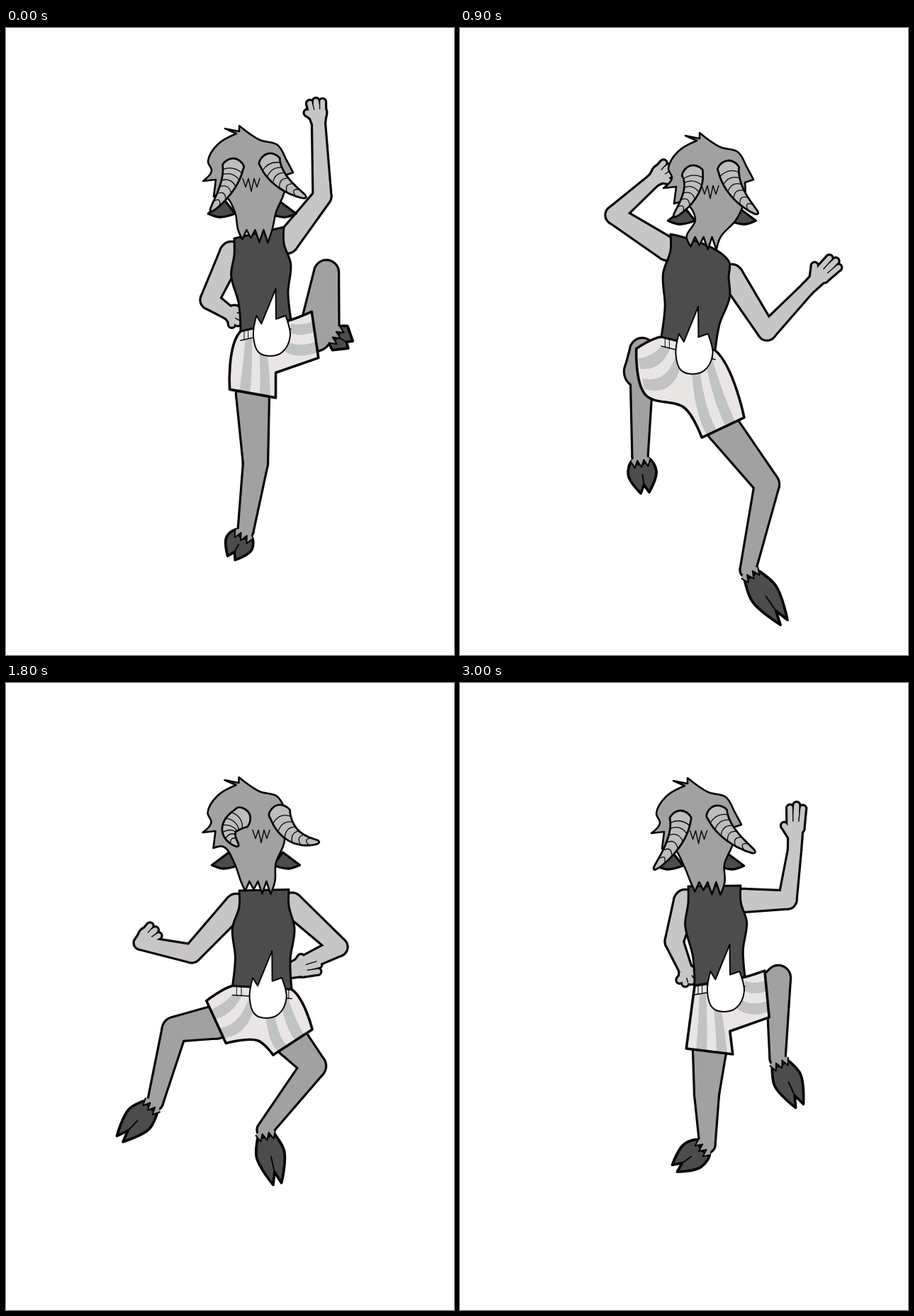
An HTML page with a canvas that plays this animation: 632 by 885 pixels, repeating every 3.1 s.

```html
<!DOCTYPE html>
<html lang="en">
<head>
<meta charset="utf-8">
<title>Dancing faun</title>
<style>
html, body { margin: 0; width: 100%; height: 100%; overflow: hidden; background: #fff; }
canvas { display: block; }
</style>
</head>
<body>
<canvas id="stage" width="632" height="885"></canvas>
<script>
const ctx = document.getElementById('stage').getContext('2d');
const LOOP = 3100, STEP = 100;
const FUR = '#a1a1a1', SKIN = '#c8c5c7', DARK = '#4c4c4c', CLOTH = '#e9e5e5', STRIPE = '#c1c3c2', HORN = '#bdbdbd';

// Arms: shoulder, elbow, wrist, fingertip. Legs: hem, knee, ankle, toe. Horns: tips only.
const poses = [
  { time: 0, head: [343, 212], horns: [[289, 258], [423, 239]], waist: [[331, 428], [402, 412]],
    armL: [[318, 318], [287, 384], [314, 402], [332, 408]], armR: [[396, 302], [446, 238], [441, 135], [437, 101]],
    legL: [[348, 516], [352, 614], [338, 710], [318, 748]], legR: [[436, 433], [452, 345], [459, 430], [486, 447]] },
  { time: 300, head: [347, 210], horns: [[290, 261], [432, 230]], waist: [[334, 437], [403, 410]],
    armL: [[322, 318], [261, 371], [290, 305], [318, 284]], armR: [[395, 302], [463, 364], [463, 282], [424, 268]],
    legL: [[340, 525], [316, 590], [304, 690], [293, 767]], legR: [[435, 456], [467, 460], [449, 525], [507, 550]] },
  { time: 900, head: [352, 222], horns: [[302, 266], [420, 262]], waist: [[284, 436], [360, 455]],
    armL: [[293, 312], [218, 264], [273, 215], [296, 195]], armR: [[383, 350], [433, 428], [490, 368], [533, 326]],
    legL: [[255, 485], [257, 455], [254, 605], [261, 656]], legR: [[371, 564], [433, 644], [406, 765], [457, 839]] },
  { time: 1400, head: [350, 212], horns: [[293, 253], [430, 243]], waist: [[301, 435], [391, 437]],
    armL: [[320, 318], [272, 404], [276, 345], [268, 328]], armR: [[398, 325], [484, 340], [436, 272], [425, 200]],
    legL: [[293, 527], [282, 566], [301, 668], [262, 731]], legR: [[415, 472], [458, 471], [380, 545], [445, 572]] },
  { time: 2200, head: [335, 202], horns: [[362, 207], [453, 206]], waist: [[338, 420], [415, 428]],
    armL: [[330, 310], [258, 358], [228, 442], [262, 464]], armR: [[408, 300], [432, 388], [454, 466], [462, 493]],
    legL: [[300, 430], [254, 366], [183, 450], [126, 488]], legR: [[394, 542], [387, 588], [330, 693], [273, 758]] },
  { time: 2600, head: [337, 210], horns: [[284, 265], [414, 235]], waist: [[338, 427], [410, 427]],
    armL: [[326, 312], [280, 370], [303, 485], [325, 550]], armR: [[405, 312], [446, 345], [455, 445], [472, 482]],
    legL: [[300, 475], [260, 468], [278, 568], [233, 601]], legR: [[408, 528], [416, 560], [419, 672], [458, 718]] },
  { time: 3000, head: [335, 208], horns: [[274, 263], [416, 239]], waist: [[331, 427], [402, 415]],
    armL: [[318, 308], [302, 365], [318, 404], [327, 422]], armR: [[400, 307], [462, 306], [472, 236], [475, 168]],
    legL: [[352, 520], [348, 580], [349, 652], [303, 685]], legR: [[433, 439], [449, 416], [448, 530], [479, 597]] }
];

// Shapes around a local origin.
const HAIR = [[-34, -70], [-14, -66], [-14, -74], [15, -54], [40, -47], [53, -25], [62, -8], [50, -4], [50, 18], [38, 48]];
const HAIR_LEFT = [[-20, 48], [-36, 24], [-50, 26], [-47, 2], [-65, 4], [-53, -10], [-58, -24], [-44, -48], [-18, -63]];
const EAR = [[38, 32], [62, 50], [46, 55], [24, 50]];
const TAIL = [[-26, 0.3], [-24, 0.6], [-16, 0.48], [0, 1], [4, 0.55], [17, 0.6], [26, 0.3], [17, 0.06], [0, 0], [-17, 0.06]];
const HOOF = [[0.05, -0.5], [0.45, -1], [1, -0.3], [0.78, 0], [1, 0.3], [0.45, 1], [0.05, 0.5]];

const add = (a, b) => [a[0] + b[0], a[1] + b[1]];
const sub = (a, b) => [a[0] - b[0], a[1] - b[1]];
const scale = (a, k) => [a[0] * k, a[1] * k];
const mix = (a, b, u) => add(a, scale(sub(b, a), u));
const length = a => Math.hypot(...a) || 1;
const unit = a => scale(a, 1 / length(a));
const left = a => [-a[1], a[0]];
const mixAll = (a, b, u) => a.map((p, i) => mix(p, b[i], u));

// Blends a chain of joints bone by bone, so that limbs rotate.
function blendChain(a, b, u) {
  const joints = [mix(a[0], b[0], u)];
  for (let i = 1; i < a.length; i++) {
    const p = sub(a[i], a[i - 1]), q = sub(b[i], b[i - 1]);
    const from = Math.atan2(p[1], p[0]), to = Math.atan2(q[1], q[0]);
    const angle = from + Math.atan2(Math.sin(to - from), Math.cos(to - from)) * u;
    const size = length(p) + (length(q) - length(p)) * u;
    joints.push(add(joints[i - 1], [Math.cos(angle) * size, Math.sin(angle) * size]));
  }
  return joints;
}

function poseAt(time) {
  const i = poses.findLastIndex(p => p.time <= time);
  const a = poses[i], b = poses[(i + 1) % poses.length];
  const v = (time - a.time) / ((b.time || LOOP) - a.time), u = v * v * (3 - 2 * v);
  const pose = { head: mix(a.head, b.head, u) };
  for (const name of ['horns', 'waist']) pose[name] = mixAll(a[name], b[name], u);
  for (const name of ['armL', 'armR', 'legL', 'legR']) pose[name] = blendChain(a[name], b[name], u);
  return pose;
}

// Closed curve through the points; sharp turns stay corners.
function outline(pts) {
  const n = pts.length;
  const tangents = pts.map((p, i) => {
    const a = unit(sub(p, pts[(i + n - 1) % n])), b = unit(sub(pts[(i + 1) % n], p));
    return a[0] * b[0] + a[1] * b[1] < 0.35 ? [0, 0] : unit(add(a, b));
  });
  const path = new Path2D();
  path.moveTo(...pts[0]);
  pts.forEach((p, i) => {
    const j = (i + 1) % n, q = pts[j], k = length(sub(q, p)) / 3;
    path.bezierCurveTo(...add(p, scale(tangents[i], k)), ...sub(q, scale(tangents[j], k)), ...q);
  });
  path.closePath();
  return path;
}

function ink(pts, fill, width) {
  const path = outline(pts);
  ctx.fillStyle = fill;
  ctx.fill(path);
  ctx.lineWidth = width;
  ctx.stroke(path);
}

function line(width, ...pts) {
  ctx.lineWidth = width;
  ctx.beginPath();
  pts.forEach(p => ctx.lineTo(...p));
  ctx.stroke();
}

// Tapered round-ended segments along the joints.
function tube(joints, radii) {
  const parts = [];
  joints.forEach((p, i) => {
    const disc = new Path2D();
    disc.arc(...p, radii[i], 0, 7);
    parts.push(disc);
    if (!i) return;
    const o = joints[i - 1], n = left(unit(sub(p, o))), side = new Path2D();
    const a = scale(n, radii[i - 1]), b = scale(n, radii[i]);
    [add(o, a), add(p, b), sub(p, b), sub(o, a)].forEach(q => side.lineTo(...q));
    side.closePath();
    parts.push(side);
  });
  return parts;
}

// Outlines several paths as a single silhouette.
function inkUnion(parts, fill) {
  ctx.lineWidth = 6.4;
  parts.forEach(p => ctx.stroke(p));
  ctx.fillStyle = fill;
  parts.forEach(p => ctx.fill(p));
}

function drawArm([shoulder, elbow, wrist, tip], side) {
  const reach = sub(tip, wrist), across = left(unit(reach)), size = length(reach);
  const open = Math.min(1, Math.max(0, (size - 34) / 25));
  const palm = mix(wrist, tip, 0.45), palmWidth = 14 - 3 * open;
  const parts = tube([shoulder, elbow, wrist, palm], [15, 11.5, 8, palmWidth - 2]);
  for (const k of [-1, 0, 1]) {
    const end = add(add(wrist, scale(reach, 0.93 - 0.06 * Math.abs(k))), scale(across, k * 9));
    parts.push(...tube([add(palm, scale(across, k * 6)), end], [5, 3.5]));
  }
  const thumb = add(mix(wrist, tip, 0.5), scale(across, -side * (palmWidth + 5 * open)));
  parts.push(...tube([mix(wrist, tip, 0.2), thumb], [5, 3.5]));
  inkUnion(parts, SKIN);
  for (const k of [-4, 4]) line(1.4, add(mix(wrist, tip, 0.6), scale(across, k)), add(mix(wrist, tip, 0.9), scale(across, k * 1.3)));
}

function drawLeg(root, [hem, knee, ankle, toe]) {
  const reach = sub(toe, ankle), dir = unit(reach), across = left(dir);
  ink(HOOF.map(([u, v]) => add(add(ankle, scale(reach, u)), scale(across, v * 20))), DARK, 3.8);
  line(2, mix(ankle, toe, 0.78), mix(ankle, toe, 0.5));
  inkUnion(tube([root, hem, knee, ankle], [22, 22, 16, 9.5]), FUR);
  const tuft = [];
  for (let i = 0; i <= 6; i++) {
    const v = (i / 3 - 1) * 14, u = i % 2 ? 15 : 5;
    tuft.push(add(ankle, add(scale(across, v), scale(dir, u))));
  }
  ctx.fillStyle = FUR;
  ctx.fill(outline([sub(ankle, scale(dir, 6)), ...tuft]));
  line(2, ...tuft);
}

// Points and leg roots of the shorts, from the waist and the hems.
function shortsShape(p) {
  const [wl, wr] = p.waist, middle = mix(wl, wr, 0.5), hems = mix(p.legL[0], p.legR[0], 0.5);
  const crotch = [middle[0] + (hems[0] - middle[0]) * 0.55, hems[1] + 12];
  const leg = (waist, hem, side) => {
    const root = mix(mix(middle, crotch, 0.5), waist, 0.3);
    const out = scale(left(unit(sub(hem, root))), side * 33);
    return { waist, root, outer: add(hem, out), inner: sub(hem, out) };
  };
  return { middle, crotch, l: leg(wl, p.legL[0], 1), r: leg(wr, p.legR[0], -1) };
}

function drawShorts({ middle, crotch, l, r }) {
  const path = outline([l.waist, l.outer, l.inner, crotch, r.inner, r.outer, r.waist]);
  ctx.fillStyle = CLOTH;
  ctx.fill(path);
  ctx.save();
  ctx.clip(path);
  ctx.fillStyle = STRIPE;
  for (const { waist, outer, inner } of [l, r]) {
    const hip = mix(waist, outer, 0.5);
    for (const f of [0.12, 0.56]) {
      const g = f + 0.23;
      ctx.beginPath();
      ctx.moveTo(...mix(middle, waist, f));
      ctx.quadraticCurveTo(...mix(crotch, hip, f), ...mix(inner, outer, f));
      ctx.lineTo(...mix(inner, outer, g));
      ctx.quadraticCurveTo(...mix(crotch, hip, g), ...mix(middle, waist, g));
      ctx.fill();
    }
  }
  const drop = q => add(q, [0, 13]);
  ctx.fillStyle = CLOTH;
  ctx.beginPath();
  [l.waist, r.waist, drop(r.waist), drop(l.waist)].forEach(q => ctx.lineTo(...q));
  ctx.fill();
  line(1.5, drop(l.waist), drop(r.waist));
  for (const f of [0.07, 0.15, 0.88, 0.95]) {
    const q = mix(l.waist, r.waist, f);
    line(1, q, drop(q));
  }
  ctx.restore();
  ctx.lineWidth = 3.6;
  ctx.stroke(path);
}

function drawVest(p) {
  const [wl, wr] = p.waist, sl = p.armL[0], sr = p.armR[0];
  const edge = (shoulder, waist, out) => [
    add(shoulder, [-out, -21]), add(shoulder, [-out, 2]),
    add(mix(shoulder, waist, 0.28), [out, 0]), add(mix(shoulder, waist, 0.65), [-out / 2, 0]), waist];
  ink([...edge(sr, wr, 4), ...edge(sl, wl, -4).reverse()], DARK, 3);
}

function drawTail(middle) {
  ink(TAIL.map(([x, u]) => add(middle, [x + 6 + 8 * u, 43 - 95 * u])), '#fff', 2);
}

function drawHorn(base, mid, tip) {
  const control = sub(scale(mid, 2), mix(base, tip, 0.5));
  const sideA = [], sideB = [], count = 14;
  for (let i = 0; i <= count; i++) {
    const u = i / count, a = mix(base, control, u), b = mix(control, tip, u);
    const n = scale(left(unit(sub(b, a))), 14 * Math.pow(1 - u, 0.6) + 1);
    sideA.push(add(mix(a, b, u), n));
    sideB.push(sub(mix(a, b, u), n));
  }
  const cap = add(base, scale(unit(sub(base, control)), 10));
  ink([cap, ...sideA, ...sideB.slice().reverse()], HORN, 2.8);
  for (let i = 2; i < count; i += 2) {
    ctx.lineWidth = 1.3;
    ctx.beginPath();
    ctx.moveTo(...sideA[i]);
    ctx.quadraticCurveTo(...mix(sideA[i - 2], sideB[i - 2], 0.5), ...sideB[i]);
    ctx.stroke();
  }
}

function drawHead(p) {
  const { head, horns: [tipL, tipR] } = p;
  const turn = (tipL[0] + tipR[0]) / 2 - head[0] - 12;
  const chest = mix(p.armL[0], p.armR[0], 0.5);
  const nape = [head[0] * 0.4 + chest[0] * 0.6, head[1] + 72];
  const at = q => add(head, q);
  for (const side of [-1, 1]) ink(EAR.map(([x, y]) => at([side * x + 4 + turn * 0.2, y])), DARK, 3.4);

  const spikes = [];
  for (let i = 0; i <= 8; i++) {
    const fall = i % 2 ? 16 + 4 * Math.sin(i * 2.3) : 1;
    spikes.push(add(nape, [24 - i * 6, fall]));
  }
  ink([...HAIR.map(at), ...spikes, ...HAIR_LEFT.map(at)], FUR, 2.6);

  const baseL = at([-23 + turn / 2, -18]), baseR = at([28 + turn / 2, -25]);
  const lock = add(mix(baseL, baseR, 0.5), [0, 18]);
  const zigzag = [0, 1, 2, 3, 4, 5, 6].map(i => add(lock, [i * 4 - 12, i % 2 ? 16 + 6 * (i === 3) : 4]));
  line(1.4, ...zigzag);
  drawHorn(baseL, add(mix(baseL, tipL, 0.5), [8 - turn * 0.8, -2]), tipL);
  drawHorn(baseR, add(mix(baseR, tipR, 0.5), [-9, 2 + turn * 0.3]), tipR);
}

function draw(time) {
  const p = poseAt(time), shorts = shortsShape(p);
  ctx.fillStyle = '#fff';
  ctx.fillRect(0, 0, 632, 885);
  ctx.strokeStyle = '#060606';
  ctx.lineJoin = ctx.lineCap = 'round';
  drawArm(p.armL, -1);
  drawArm(p.armR, 1);
  drawLeg(shorts.l.root, p.legL);
  drawLeg(shorts.r.root, p.legR);
  drawShorts(shorts);
  drawVest(p);
  drawTail(shorts.middle);
  drawHead(p);
}

function tick() {
  draw(Math.floor(performance.now() % LOOP / STEP) * STEP);
  requestAnimationFrame(tick);
}
tick();
</script>
</body>
</html>
```
